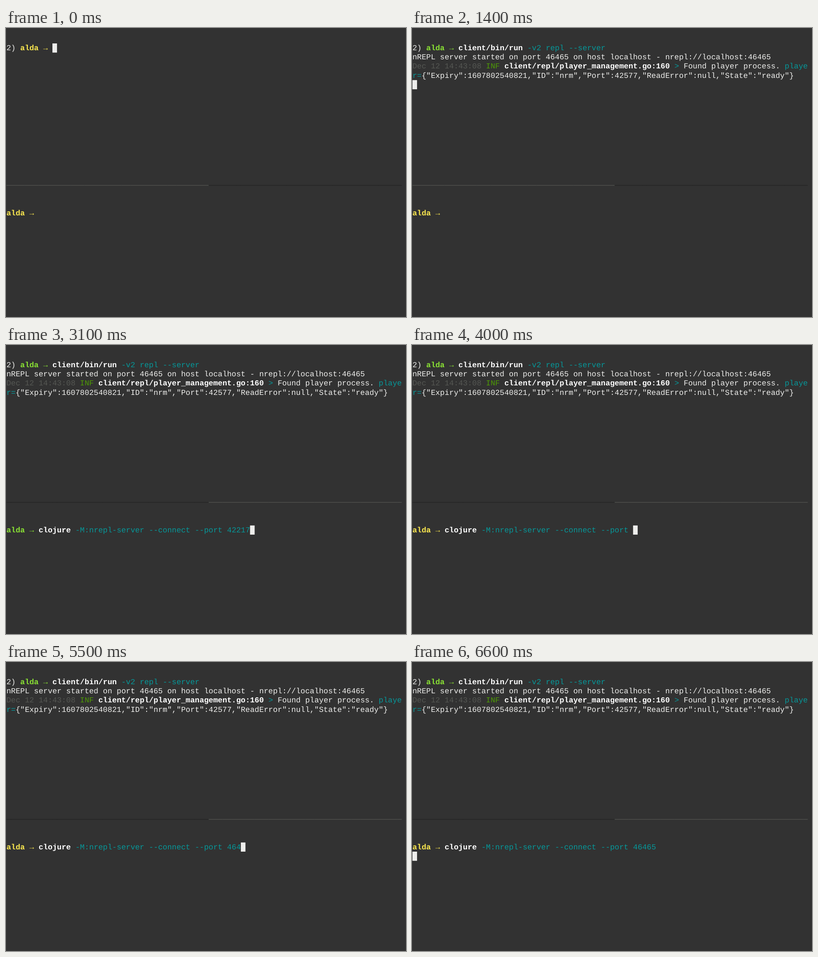
Animation, 879 px wide and 637 px high, one loop 8000 ms. Source, as an HTML page:

```html
<!DOCTYPE html>
<html lang="en">
<head>
<meta charset="utf-8">
<title>Two terminal panes</title>
<style>
  html, body { margin: 0; width: 100%; height: 100%; overflow: hidden; background: #323232; }
  svg {
    position: absolute; left: 0; top: 0; width: 879px; height: 637px;
    font: 16.83px "Liberation Mono", monospace;
    font-variant-ligatures: none;
    text-rendering: geometricPrecision;
  }
  text { white-space: pre; }
  #cursor { fill: #eeeeec; }
  .plain { fill: #eeeeec; }
  .cmd { fill: #fff; font-weight: bold; }
  .arg { fill: #06989a; }
  .info { fill: #4e9a06; }
  .dim { fill: #555753; }
  .dark { fill: #222; }
  .under { fill: #323232; }
  .yellow { fill: #fce94f; }
  .green { fill: #8ae234; }
  .bold { font-weight: bold; }
</style>
</head>
<body>
<svg id="screen" viewBox="0 0 879 637"><rect id="cursor" width="10.1" height="20.21"/></svg>
<script>
const LOOP = 8000, CELL = 10.1, LINE = 20.21;
const LEFT = 1, TOP = 34, BASELINE = 15;
const screen = document.getElementById('screen');
const cursor = document.getElementById('cursor');
const pieces = [];

function place(el, row, col, drop = 0) {
  el.setAttribute('x', LEFT + col * CELL);
  el.setAttribute('y', TOP + row * LINE + drop);
}

// Text on the character grid, visible from start to end (ms).
function put(row, col, text, style, start = 0, end = LOOP) {
  const el = document.createElementNS(screen.namespaceURI, 'text');
  el.textContent = text;
  el.setAttribute('class', style);
  place(el, row, col, BASELINE);
  screen.append(el);
  pieces.push({ el, start, end });
}

// Consecutive [text, style] runs on one line.
function putLine(row, col, runs, start, end) {
  for (const [text, style] of runs) {
    put(row, col, text, style, start, end);
    col += text.length;
  }
}

function prompt(row, col, color, start, end) {
  putLine(row, col, [['alda', color + ' bold'], [' →', color]], start, end);
}

// Upper pane: the server
put(0, 0, '2)', 'plain');
prompt(0, 3, 'yellow', 0, 500);
prompt(0, 3, 'green', 500);
putLine(0, 10, [['client/bin/run', 'cmd'], [' -v2 repl --server', 'arg']], 500);
put(1, 0, 'nREPL server started on port 46465 on host localhost - nrepl://localhost:46465', 'plain', 1400);
putLine(2, 0, [
  ['Dec 12 14:43:08 ', 'dim'], ['INF ', 'info'],
  ['client/repl/player_management.go:160', 'cmd'],
  [' > ', 'arg'], ['Found player process. ', 'plain'], ['playe', 'arg']
], 1400);
putLine(3, 0, [
  ['r=', 'arg'],
  ['{"Expiry":1607802540821,"ID":"nrm","Port":42577,"ReadError":null,"State":"ready"}', 'plain']
], 1400);

// Divider: the lit half marks the active pane
const divider = (left, right, start, end) =>
  putLine(15, 0, [['─'.repeat(44), left], ['─'.repeat(42), right]], start, end);
divider('dim', 'dark', 0, 2200);
divider('dark', 'dim', 2200);

// Lower pane: the client
prompt(18, 0, 'yellow', 0, 3100);
prompt(18, 0, 'green', 3100, 3500);
prompt(18, 0, 'yellow', 3500);
putLine(18, 7, [['clojure', 'cmd'], [' -M:nrepl-server --connect --port ', 'arg']], 3100);
put(18, 48, '42217', 'arg', 3100, 4000);
putLine(18, 49, [['2', 'under'], ['217', 'dim']], 5000, 5300);
const keyTimes = [5000, 5300, 5500, 5900, 6100];
[...'46465'].forEach((digit, i) => put(18, 48 + i, digit, 'arg', keyTimes[i]));

// [time, row, column]
const cursorSteps = [
  [0, 0, 10], [500, 0, 42], [1400, 4, 0], [2200, 18, 7], [3100, 18, 53], [4000, 18, 48],
  ...keyTimes.map((time, i) => [time, 18, 49 + i]),
  [6600, 19, 0]
];

const origin = performance.now();
function render(now) {
  const t = Math.max(0, now - origin) % LOOP;
  for (const { el, start, end } of pieces)
    el.style.visibility = t >= start && t < end ? 'visible' : 'hidden';
  const [, row, col] = cursorSteps.findLast(([time]) => time <= t);
  place(cursor, row, col);
  requestAnimationFrame(render);
}
render(origin);
</script>
</body>
</html>
```
